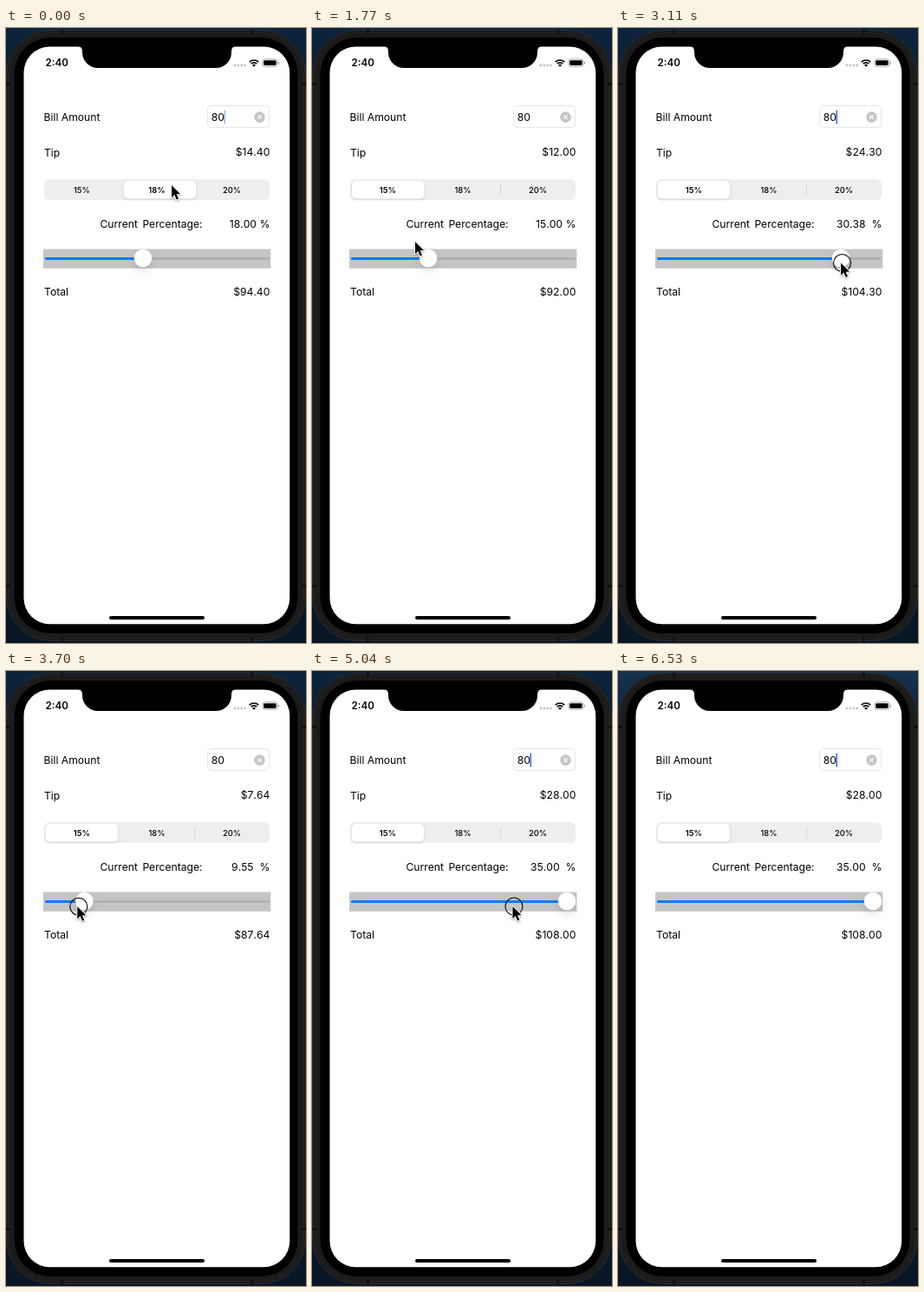
An HTML page with a canvas for the animation above (6.63 s loop, 346 by 708 pixels).

```html
<!DOCTYPE html>
<html lang="en">
<head>
<meta charset="utf-8">
<title>Tip calculator</title>
<style>
  html, body { margin: 0; width: 100%; height: 100%; overflow: hidden; background: #0a1a2b; }
  canvas { display: block; width: 346px; height: 708px; }
</style>
</head>
<body>
<canvas id="stage"></canvas>
<script>
const W = 346, H = 708, LOOP = 6630, TICK = 148.2;
const FONT = 'Inter, "Liberation Sans", sans-serif';
const BILL = 80;
const canvas = document.getElementById('stage');
const ctx = canvas.getContext('2d');
const ratio = window.devicePixelRatio || 1;
canvas.width = W * ratio;
canvas.height = H * ratio;

// The tick of each event
const TAP = 8, CHOOSE = 9, GRAB = 16, DROP = 30, HIDE = 41, LAST = 44;

const ease = p => (1 - Math.cos(Math.PI * p)) / 2;
const clamp = v => Math.min(1, Math.max(0, v));

// Each leg is [start, end, ...goal]; the value rests between legs
function travel(from, legs, tick) {
  return legs.reduce((at, [start, end, ...goal]) => {
    const p = ease(clamp((tick - start) / (end - start)));
    return at.map((v, i) => v + (goal[i] - v) * p);
  }, from);
}

const percentAt = tick => travel([18], [
  [TAP, CHOOSE, 15], [GRAB, 20, 30.38], [22, 26, 5.976], [26.5, 29, 35]
], tick)[0];

const thumbX = percent => 54 + (percent - 5) * 8;

// While dragging, the hand runs a little ahead of the thumb
function cursorAt(tick) {
  const [x, y] = travel([191, 181], [
    [1, 4, 160, 254], [4.5, TAP, 86.5, 189], [CHOOSE, 12, 119, 246], [12.5, 14, 135, 270],
    [GRAB, 29, 294, 271.5], [DROP, 32.5, 184, 271], [32.5, 36, 306, 271], [36, 39.5, 300, 633]
  ], tick);
  const dragging = tick >= GRAB && tick <= DROP;
  return [dragging ? thumbX(percentAt(tick + 0.16)) : x, y];
}

// The white pill slides quickly to the chosen segment
const pillAt = tick => tick < CHOOSE
  ? 174 + 3.5 * 0.1 ** tick
  : 87.3 + 86.7 * 0.25 ** (tick - TAP);

// Blinks once a second with short fades
function caretAt(ms) {
  const p = (ms + 40) % 1000;
  return p < 580 ? clamp(p / 80) : clamp(1 - (p - 580) / 160);
}

function box(x, y, w, h, r, fill, stroke, line = 1) {
  ctx.beginPath();
  ctx.roundRect(x, y, w, h, r);
  if (fill) { ctx.fillStyle = fill; ctx.fill(); }
  if (stroke) { ctx.strokeStyle = stroke; ctx.lineWidth = line; ctx.stroke(); }
}

function disc(x, y, r, fill) {
  ctx.beginPath();
  ctx.arc(x, y, r, 0, Math.PI * 2);
  ctx.fillStyle = fill;
  ctx.fill();
}

function text(str, x, y, { size = 12.15, weight = 400, align = 'left', color = '#000', kerning = 'auto' } = {}) {
  ctx.font = `${weight} ${size}px ${FONT}`;
  ctx.fontKerning = kerning;
  ctx.textAlign = align;
  ctx.fillStyle = color;
  ctx.fillText(str, x, y);
}

function shadowed(color, blur, dy, draw) {
  ctx.save();
  ctx.shadowColor = color;
  ctx.shadowBlur = blur * ratio;
  ctx.shadowOffsetY = dy * ratio;
  draw();
  ctx.restore();
}

function phone(bright) {
  const sky = ctx.createLinearGradient(0, 0, 0, H);
  sky.addColorStop(0, bright ? '#15324f' : '#0c243c');
  sky.addColorStop(0.16, '#0a1a2b');
  sky.addColorStop(1, '#081626');
  ctx.fillStyle = sky;
  ctx.fillRect(0, 0, W, H);

  box(0.5, 2.5, 345, 703, 52, '#1b1b1b', '#2f2f2f');
  box(3.5, 5.5, 339, 697, 49, null, '#242424');
  // Antenna gaps, mirrored on all four sides
  for (const far of [0, 1]) {
    for (const y of [63, 641]) box(far * 341, y, 5, 3, 0, '#101010');
    for (const x of [63, 282]) box(x, 2 + far * 699, 3, 5, 0, '#101010');
  }
  box(9.5, 11, 327, 686, 42, '#000');
  box(20.5, 21.5, 306.7, 664.7, 30, '#fff');

  ctx.beginPath();
  ctx.moveTo(83, 21);
  ctx.quadraticCurveTo(88, 21.5, 88, 27);
  ctx.arcTo(88, 46, 107, 46, 18);
  ctx.arcTo(260, 46, 260, 28, 18);
  ctx.lineTo(260, 27);
  ctx.quadraticCurveTo(260, 21.5, 265, 21);
  ctx.fillStyle = '#000';
  ctx.fill();
  box(119, 677, 110, 4, 2, '#000');
}

function statusBar() {
  text('2:40', 45.6, 44.3, { size: 11.6, weight: 600 });
  for (let i = 0; i < 4; i++) disc(263.9 + i * 3.9, 43, 1.4, '#c4c4c6');

  // Wi-Fi fan
  const left = -Math.PI * 0.75, right = -Math.PI * 0.25;
  ctx.strokeStyle = ctx.fillStyle = '#000';
  ctx.lineWidth = 1.7;
  for (const r of [4.6, 7.4]) {
    ctx.beginPath();
    ctx.arc(286, 44.4, r, left, right);
    ctx.stroke();
  }
  ctx.beginPath();
  ctx.moveTo(286, 44.7);
  ctx.arc(286, 44.7, 2.8, left, right);
  ctx.fill();

  box(295.9, 35.9, 17, 8.4, 2.5, null, '#9c9c9c', 0.9);
  box(297.2, 37.2, 14.4, 5.8, 1.4, '#000');
  box(313.9, 38.7, 1.1, 2.8, 0.6, '#9c9c9c');
}

function billField(caret) {
  text('Bill Amount', 43.6, 107.3);
  box(232.5, 89.5, 71, 25, 4, '#fff', '#e6e6e8');
  text(String(BILL), 236.7, 107);
  ctx.globalAlpha = caret;
  box(251.5, 94.5, 1.5, 16, 0.6, '#3564e4');
  ctx.globalAlpha = 1;

  disc(292.5, 102.6, 6.3, '#c6c6c9');
  ctx.strokeStyle = '#fff';
  ctx.lineWidth = 1.2;
  ctx.beginPath();
  for (const d of [2.3, -2.3]) {
    ctx.moveTo(292.5 - d, 100.3);
    ctx.lineTo(292.5 + d, 104.9);
  }
  ctx.stroke();
}

function segments(pill, selected, dimmed) {
  box(44, 174.3, 260, 23.7, 6, '#eeeeef');
  if (selected === 0) box(217, 180, 1, 12.5, 0.5, '#d3d3d6');
  shadowed('rgba(0,0,0,0.14)', 3, 1, () => box(pill - 41.7, 176, 83.4, 20.6, 5, '#fff'));
  ['15%', '18%', '20%'].forEach((label, i) => {
    text(label, 87.4 + i * 86.6, 189.8, {
      size: 9.4,
      weight: i === selected ? 600 : 500,
      align: 'center',
      color: i === dimmed ? '#8e8e90' : '#000'
    });
  });
}

function slider(percent) {
  const x = thumbX(percent);
  box(43, 254.4, 262.3, 22.4, 0, '#c5c5c6');
  box(45, 264, 258.5, 3, 1.5, '#b0b0b4');
  box(45, 264, x - 45, 3, 1.5, '#007aff');
  shadowed('rgba(0,0,0,0.1)', 8, 5, () => disc(x, 265, 10.3, '#fff'));
}

function amounts(percent, dragged) {
  const tip = BILL * percent / 100;
  const right = { align: 'right', kerning: 'none' };
  text('Tip', 44, 148);
  text('$' + tip.toFixed(2), 304.3, 147.3, right);
  text('Current', 108.5, 229.8);
  text('Percentage:', 226.6, 229.8, { align: 'right' });
  text(percent.toFixed(2) + (dragged ? '  %' : ' %'), 304.3, 229.8, right);
  text('Total', 44, 307.7);
  text('$' + (BILL + tip).toFixed(2), 304.3, 307.5, right);
}

function cursor(x, y, pressed) {
  if (pressed) {
    ctx.beginPath();
    ctx.arc(x + 1.5, y, 10, 0, Math.PI * 2);
    ctx.strokeStyle = '#000';
    ctx.lineWidth = 1.1;
    ctx.stroke();
  }
  ctx.save();
  ctx.translate(x, y);
  ctx.beginPath();
  ctx.moveTo(0, 0);
  ctx.lineTo(0, 14.2);
  ctx.lineTo(3.3, 11.1);
  ctx.lineTo(5.7, 16.6);
  ctx.lineTo(8, 15.6);
  ctx.lineTo(5.6, 10.2);
  ctx.lineTo(10, 10.1);
  ctx.closePath();
  ctx.lineJoin = 'round';
  ctx.strokeStyle = '#fff';
  ctx.lineWidth = 2;
  shadowed('rgba(0,0,0,0.35)', 2, 1, () => ctx.stroke());
  ctx.fillStyle = '#000';
  ctx.fill();
  ctx.restore();
}

function draw(ms) {
  const tick = Math.floor((ms + 12) / TICK);
  const percent = percentAt(tick);
  const tapping = tick === TAP;
  const dragging = tick >= GRAB && tick <= DROP;
  const pokingTrack = tick >= 33 && tick <= 35;

  ctx.setTransform(ratio, 0, 0, ratio, 0, 0);
  phone(tick >= LAST);
  statusBar();
  billField(caretAt(tick * TICK));
  segments(pillAt(tick), tick < CHOOSE ? 1 : 0, tapping ? 0 : -1);
  slider(percent);
  amounts(percent, tick >= GRAB);
  if (tick < HIDE) cursor(...cursorAt(tick), tapping || dragging || pokingTrack);
}

const start = performance.now();
function loop() {
  draw((performance.now() - start) % LOOP);
  requestAnimationFrame(loop);
}
loop();
</script>
</body>
</html>
```
